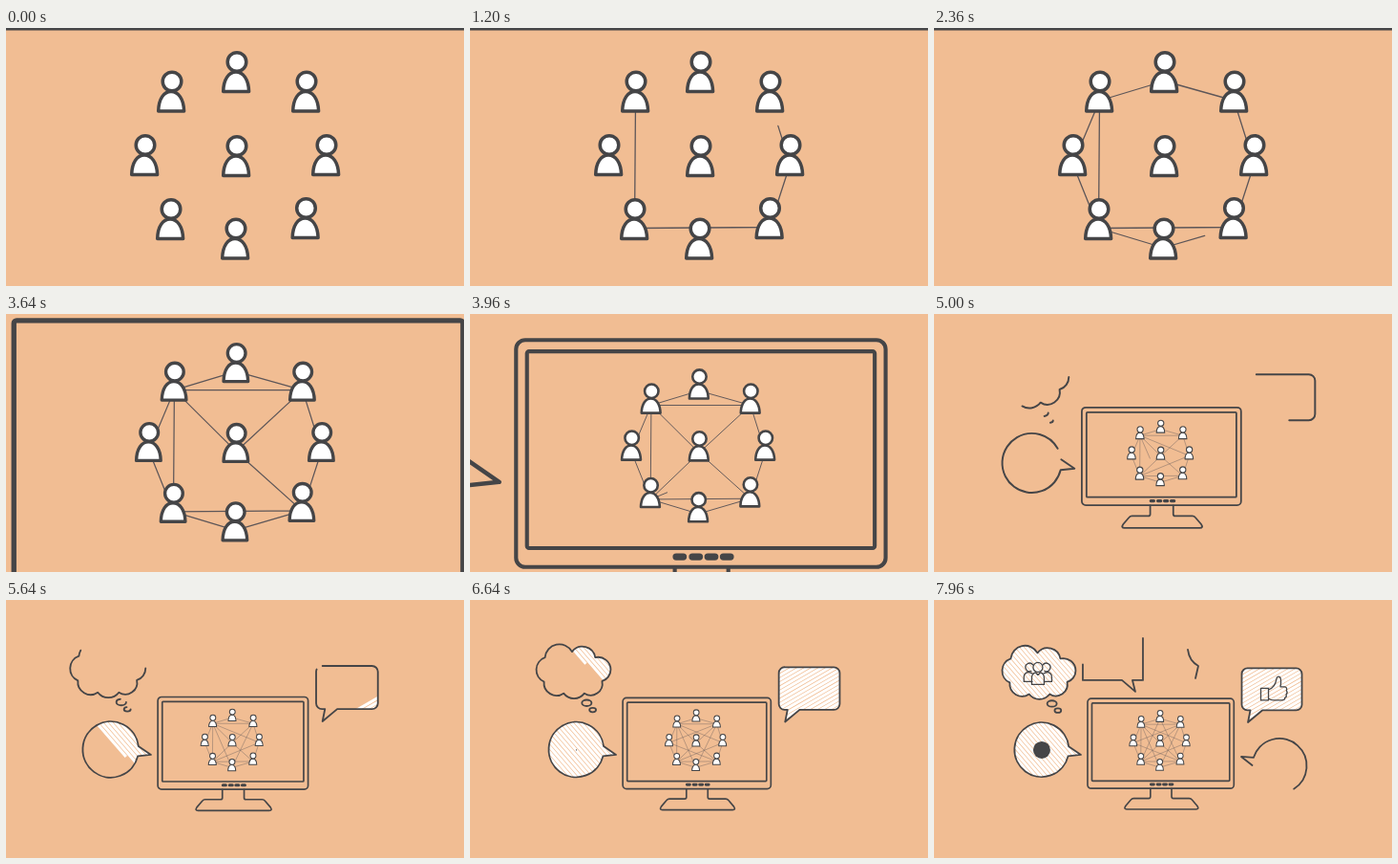
These frames come from a looping animation (480 px wide and 270 px high, 8 s). An HTML page:

```html
<!DOCTYPE html>
<html lang="en">
<head>
<meta charset="utf-8">
<title>Connected people</title>
<style>
  html, body { margin: 0; width: 100%; height: 100%; overflow: hidden; background: #f1bd93; }
  svg { display: block; width: 100vw; height: 100vh; }
  .ink { fill: none; stroke: #454547; stroke-linecap: round; stroke-linejoin: round; }
  .person { fill: #fff; stroke-width: 3.5; }
  .monitor { stroke-width: 5.6; }
  .mesh { stroke-width: 1.3; stroke: #5d5658; }
  .bubbles { stroke-width: 1.8; }
  .icon { stroke-width: 1.3; }
  .hatch { fill: none; stroke: #fff; stroke-width: 3; stroke-linecap: butt; }
</style>
</head>
<body>
<svg viewBox="0 0 480 270">
  <defs>
    <g id="person">
      <path d="M-14.3 31C-14 18 -8.500 10.500 -1 10.500S12.200 18 12.600 31Z"/>
      <circle r="9.800"/>
    </g>
    <path id="cloud" d="M148.500 74A12.500 12.500 0 0 1 139.600 86A12 12 0 0 1 121.300 98.500A13.500 13.500 0 0 1 99.800 98.500A13 13 0 0 1 79.500 86.500A13.500 13.500 0 0 1 80.500 61.500A15 15 0 0 1 108.500 55.500A13.500 13.500 0 0 1 132.500 61.500A13 13 0 0 1 148.500 74"/>
    <path id="round" d="M141.200 153.200L154 162L140.600 163.400A28.500 28.500 0 1 1 141.200 153.200"/>
    <path id="box" d="M329 71.500H379.500A6 6 0 0 1 385.500 77.500V109.500A6 6 0 0 1 379.500 115.500H344L329 128L331.500 115.500H328.500A6 6 0 0 1 322.500 109.500V77.500A6 6 0 0 1 329 71.500"/>
    <clipPath id="inCloud"><use href="#cloud"/></clipPath>
    <clipPath id="inRound"><use href="#round"/></clipPath>
    <clipPath id="inBox"><use href="#box"/></clipPath>
  </defs>

  <g id="camera">
    <g class="ink monitor">
      <rect x="-18.500" y="-16.500" width="525" height="322" rx="13"/>
      <rect x="-3" y="-.400" width="494" height="279" rx="3"/>
      <path d="M207 306V335Q207 341 201 341H147Q141 341 137 346L118 368Q110 380 122 380H371Q383 380 375 368L356 346Q352 341 346 341H289Q283 341 283 335V306"/>
      <path d="M209 291H219M232 291H242M254 291H264M276 291H286" stroke-width="10"/>
    </g>

    <path id="mesh" class="ink mesh"/>
    <g id="people" class="ink person"></g>

    <!-- bubbles use the coordinates of the zoomed-out view -->
    <g class="ink bubbles" transform="scale(3.4247) translate(-166.400 -108)">
      <g clip-path="url(#inRound)"><path class="hatch" data-hatch="113 156.500 49 29 42" data-t="5150 6400"/></g>
      <g clip-path="url(#inBox)"><path class="hatch" data-hatch="354 93.500 150 36 48" data-t="5420 6600"/></g>
      <g clip-path="url(#inCloud)"><path class="hatch" data-hatch="109 77 49 46 46" data-t="6320 7300"/></g>

      <use href="#round" data-t="3760 5075"/>
      <use href="#box" data-t="4200 5690"/>
      <use href="#cloud" data-t="4440 6400"/>
      <path d="M128.700 108.500a5 3.200 0 1 1 -10 0a5 3.200 0 1 1 10 0" data-t="4750 6000"/>
      <path d="M133.300 115.700a3.400 2.200 0 1 1 -6.800 0a3.400 2.200 0 1 1 6.800 0" data-t="4750 6000"/>
      <path d="M219 40V84H208L211 96L197 84H156V40H219" data-t="6890 8636"/>
      <path d="M333.500 173L322 164L334.800 165A28.500 28.500 0 1 1 333.500 173" data-t="6800 8480"/>
      <path d="M266 52Q267.500 64 277 69L274 82" data-t="7670 7960"/>

      <circle id="badge" cx="113" cy="157" fill="#454547" stroke="none"/>
      <g class="icon">
        <path d="M342.500 92.500H350.500V105H342.500Z" data-t="6700 7050"/>
        <path d="M350.500 94C355 92.500 358 89 358.800 83Q359.500 79.500 362 80.500Q364.500 82 363 91H367.500Q370.500 91.500 369.300 95Q371 97 369 99Q370 101.500 367.600 102.500Q367.800 105 364.500 105H356Q353 105 350.500 103" data-t="6850 7500"/>
        <path d="M102 74.500A4.300 4.300 0 1 1 103.800 68" data-t="7250 7600"/>
        <path d="M104 70.500a5 5 0 1 1 10 0a5 5 0 1 1 -10 0" data-t="7300 7700"/>
        <path d="M114.200 68A4.300 4.300 0 1 1 116 74.500" data-t="7350 7700"/>
        <path d="M103 85.500H94.300V81Q94.300 76.500 99 75.500L103 77" data-t="7450 7850"/>
        <path d="M102.500 88.500V82Q102.500 77 106.500 76L109 78.500L111.500 76Q115.500 77 115.500 82V88.500Z" data-t="7450 7950"/>
        <path d="M115 77L119 75.500Q123.500 76.500 123.500 81V85.500H115.500" data-t="7500 7950"/>
      </g>
    </g>
  </g>
</svg>

<script>
const LOOP = 8000;
const $ = id => document.getElementById(id);
const clamp = v => Math.min(1, Math.max(0, v));

const heads = {
  T: [242, 35.5], TL: [174, 56], TR: [315, 56],
  L: [146, 122.5], C: [242, 123.5], R: [336, 122.5],
  BL: [173, 189.5], BR: [314.5, 188.5], B: [241, 210]
};
const route = 'TL BL BR R TR T TL L BL B BR C TR TL C BL R TL B TR L BR T BL'.split(' ');

// [time, value] keys
const zoom = [[3380, 1], [3640, .953], [4000, .71], [4360, .468], [4680, .362],
              [5000, .318], [5640, .3], [8000, .292]];
const lift = [[3640, 0], [4360, 1.4], [5000, 1], [5640, .3], [8000, 0]];
const drawn = [[0, 0], [200, 14], [1000, 313], [1800, 605], [2360, 821], [2720, 991],
               [3640, 1295], [4360, 1555], [5000, 1815], [8000, 2985]];

// Monotone cubic through the keys
function spline(keys, t) {
  const last = keys.length - 1;
  if (t <= keys[0][0]) return keys[0][1];
  if (t >= keys[last][0]) return keys[last][1];
  const slope = i => (keys[i + 1][1] - keys[i][1]) / (keys[i + 1][0] - keys[i][0]);
  const tangent = i => {
    if (i === 0) return 0;
    if (i === last) return slope(i - 1);
    const a = slope(i - 1), b = slope(i);
    return a * b > 0 ? 2 * a * b / (a + b) : 0;
  };
  let i = 0;
  while (t > keys[i + 1][0]) i++;
  const [t0, v0] = keys[i], [t1, v1] = keys[i + 1];
  const h = t1 - t0, u = (t - t0) / h, w = 1 - u;
  return v0 * (1 + 2 * u) * w * w + v1 * u * u * (3 - 2 * u)
       + h * u * w * (tangent(i) * w - tangent(i + 1) * u);
}

// Back-and-forth parallel strokes, swept along their own y axis
function scribble(el) {
  const [cx, cy, angle, depth, half] = el.dataset.hatch.split(' ').map(Number);
  let d = `M${-half} ${-depth}`, side = 1;
  for (let y = -depth; y <= depth + 2; y += 3.7, side = -side) {
    d += `V${y.toFixed(1)}H${side * half}`;
  }
  el.setAttribute('d', d);
  el.setAttribute('transform', `translate(${cx} ${cy}) rotate(${angle})`);
}

function dash(el, length, rest) {
  el.style.visibility = length > 0 ? 'visible' : 'hidden';
  el.style.strokeDasharray = `${length} ${rest}`;
}

$('people').innerHTML = Object.values(heads)
  .map(([x, y]) => `<use href="#person" x="${x}" y="${y}"/>`).join('');
$('mesh').setAttribute('d', 'M' + route.map(k => `${heads[k][0] - .5} ${heads[k][1] + 20}`).join('L'));
document.querySelectorAll('[data-hatch]').forEach(scribble);

const strokes = [...document.querySelectorAll('[data-t]')].map(el => {
  const [start, end] = el.dataset.t.split(' ').map(Number);
  const shape = el.tagName === 'use' ? document.querySelector(el.getAttribute('href')) : el;
  shape.setAttribute('pathLength', 1);
  return { el, start, end };
});

function render(t) {
  const s = spline(zoom, t), up = spline(lift, t);
  $('camera').setAttribute('transform',
    `translate(${235 * (1 - s) + up / 2} ${152.5 * (1 - s) - up}) scale(${s})`);
  dash($('mesh'), spline(drawn, t), 9999);
  for (const { el, start, end } of strokes) {
    const p = clamp((t - start) / (end - start));
    dash(el, p < 1 ? p : 1.01, 2);
  }
  $('badge').setAttribute('r', 9 * clamp((t - 6600) / 600));
}

function tick() {
  render(performance.now() % LOOP);
  requestAnimationFrame(tick);
}
tick();
</script>
</body>
</html>
```
